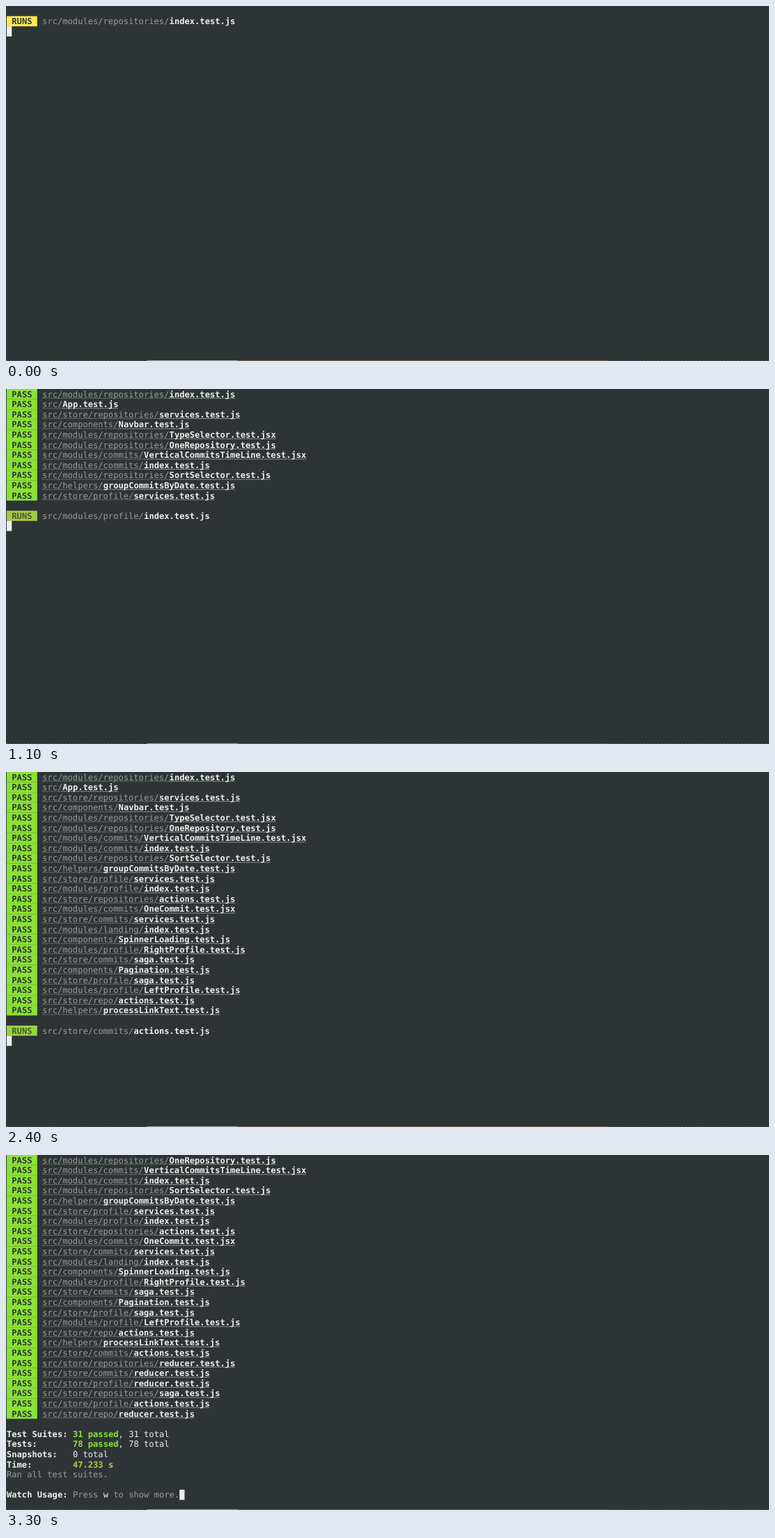
Recreate the animation shown at these times as an HTML page. Size 1096 by 511 pixels, loop 3.6 s.

```html
<!DOCTYPE html>
<html lang="en">
<head>
<meta charset="utf-8">
<title>Test run</title>
<style>
  html, body { margin: 0; width: 100%; height: 100%; overflow: hidden; background: #2e3436; }
  svg { display: block; width: 100vw; height: 100vh; }
  text {
    font: 12.125px "DejaVu Sans Mono", monospace;
    white-space: pre;
    text-rendering: geometricPrecision;
  }
  .bold { font-weight: 700; }
</style>
</head>
<body>
<svg id="stage" viewBox="0 0 1096 511" preserveAspectRatio="none">
  <g id="screen"></g>
  <g id="edge">
    <path d="M0 510.5H1096" stroke="#575352" stroke-dasharray="3 2"/>
    <path d="M203 510.5H333" stroke="#a9a8a4"/>
    <path d="M333 510.5H865" stroke="#75604f" stroke-dasharray="4 1"/>
  </g>
</svg>
<script>
const LOOP = 3600, STEP = 100;
const LEFT = 1, CELL = 7.3, ROW = 14.6, BASELINE = 11.5;
const DARK = '#2e3436', WHITE = '#eeeeec', DIM = '#9a9b9a', GREEN = '#8ae234', YELLOW = '#fce94f';

const files = `
modules/repositories/index.test.js
App.test.js
store/repositories/services.test.js
components/Navbar.test.js
modules/repositories/TypeSelector.test.jsx
modules/repositories/OneRepository.test.js
modules/commits/VerticalCommitsTimeLine.test.jsx
modules/commits/index.test.js
modules/repositories/SortSelector.test.js
helpers/groupCommitsByDate.test.js
store/profile/services.test.js
modules/profile/index.test.js
store/repositories/actions.test.js
modules/commits/OneCommit.test.jsx
store/commits/services.test.js
modules/landing/index.test.js
components/SpinnerLoading.test.js
modules/profile/RightProfile.test.js
store/commits/saga.test.js
components/Pagination.test.js
store/profile/saga.test.js
modules/profile/LeftProfile.test.js
store/repo/actions.test.js
helpers/processLinkText.test.js
store/commits/actions.test.js
store/repositories/reducer.test.js
store/commits/reducer.test.js
store/profile/reducer.test.js
store/repositories/saga.test.js
store/profile/actions.test.js
store/repo/reducer.test.js`.trim().split('\n').map(name => 'src/' + name);

const screen = document.getElementById('screen');
const x = col => LEFT + col * CELL;

const block = (row, col, cols, fill) =>
  `<rect x="${x(col)}" y="${row * ROW}" width="${cols * CELL}" height="${ROW + 0.05}" fill="${fill}"/>`;

const word = (row, col, text, fill, bold) =>
  `<text x="${x(col)}" y="${row * ROW + BASELINE}" fill="${fill}"${bold ? ' class="bold"' : ''}>${text}</text>`;

const dots = (row, from, to, color) =>
  `<path d="M${x(from)} ${row * ROW + 13.3}H${x(to)}" stroke="${color}" stroke-dasharray="1.2 1.233"/>`;

function testLine(row, label, badge, ink, file, bright, linked) {
  const split = file.lastIndexOf('/') + 1, start = 7, mid = start + split, end = start + file.length;
  return block(row, 0, 6, badge) +
    word(row, 1, label, ink, true) +
    word(row, start, file.slice(0, split), DIM) +
    word(row, mid, file.slice(split), bright, true) +
    (linked ? dots(row, start, mid, DIM) + dots(row, mid, end, bright) : '');
}

const passLine = (row, file, bright) => testLine(row, 'PASS', GREEN, DARK, file, bright, true);

// The running badge drifts from yellow towards green as the list grows.
function badgeColor(done) {
  if (!done) return YELLOW;
  const k = Math.min(1, done / 29);
  return `rgb(${Math.round(174 - 34 * k)},${Math.round(192 + 26 * k)},${Math.round(76 - 16 * k)})`;
}

function running(done) {
  const bright = done === 29 ? '#d3d7cf' : WHITE;
  const row = done + 1;
  return files.slice(0, done).map((file, i) => passLine(i, file, bright)).join('') +
    testLine(row, 'RUNS', badgeColor(done), done ? '#51562f' : DARK, files[done], bright, false) +
    block(row + 1, 0, 1, done === 29 ? '#c5c8c4' : WHITE);
}

function finished() {
  const scrolled = 5, top = files.length - scrolled + 1;
  const total = (row, title, count) =>
    word(row, 0, title, WHITE, true) +
    word(row, 13, count + ' passed', GREEN, true) +
    word(row, 22, `, ${count} total`, WHITE);
  return files.slice(scrolled).map((file, i) => passLine(i, file, WHITE)).join('') +
    total(top, 'Test Suites:', 31) +
    total(top + 1, 'Tests:', 78) +
    word(top + 2, 0, 'Snapshots:', WHITE, true) + word(top + 2, 13, '0 total', WHITE) +
    word(top + 3, 0, 'Time:', WHITE, true) + word(top + 3, 13, '47.233 s', '#b4cc48', true) +
    word(top + 4, 0, 'Ran all test suites.', DIM) +
    word(top + 6, 0, 'Watch Usage:', WHITE, true) +
    word(top + 6, 13, 'Press', DIM) + word(top + 6, 19, 'w', WHITE) +
    word(top + 6, 21, 'to show more.', DIM) +
    block(top + 6, 34, 1, WHITE);
}

let shown = -1;
function draw(time) {
  const done = Math.min(files.length, Math.floor((time % LOOP) / STEP));
  if (done !== shown) {
    shown = done;
    screen.innerHTML = done < files.length ? running(done) : finished();
  }
}

const started = performance.now();
function tick() {
  draw(performance.now() - started);
  requestAnimationFrame(tick);
}
tick();
</script>
</body>
</html>
```
